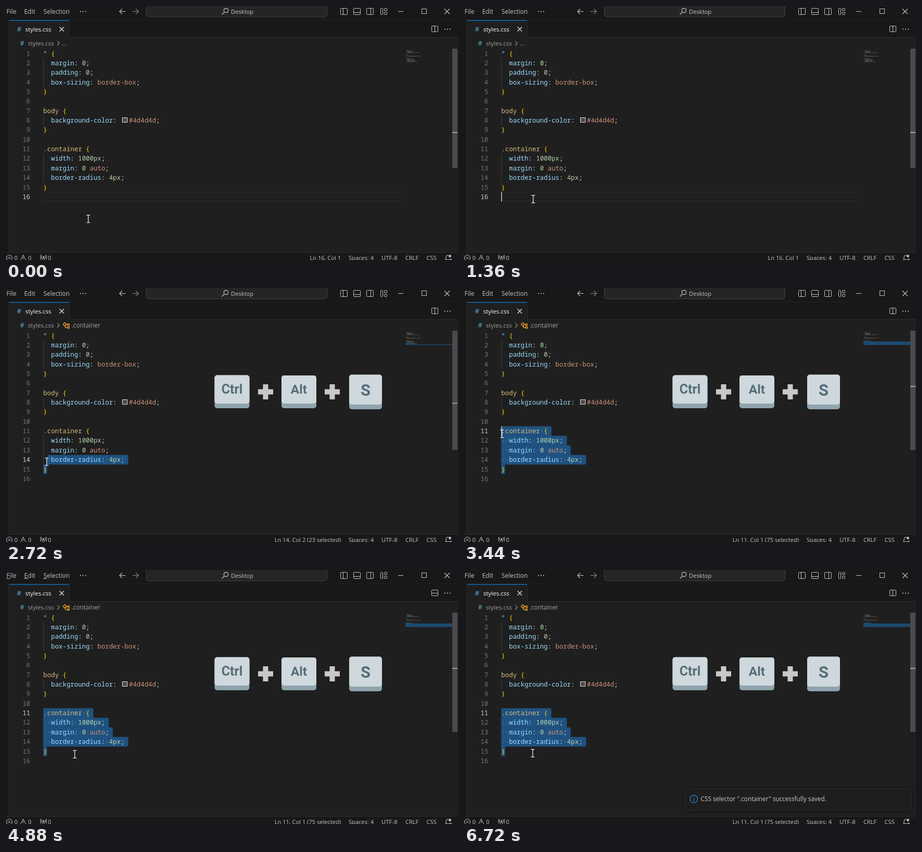
An HTML page with a canvas for the animation above (6800 ms loop, 868 px wide and 488 px high).

```html
<!DOCTYPE html>
<html lang="en">
<head>
<meta charset="utf-8">
<title>Save a CSS selector</title>
<style>
html, body { margin: 0; width: 100%; height: 100%; overflow: hidden; background: #1f1f1f; }
canvas { display: block; }
</style>
</head>
<body>
<canvas id="stage" width="868" height="488"></canvas>
<script>
const LOOP = 6800;
const ctx = document.getElementById('stage').getContext('2d');
const UI = '"Open Sans", "Noto Sans", sans-serif';
const MONO = '12.38px "Noto Sans Mono", "DejaVu Sans Mono", monospace';
const X0 = 71.6, Y0 = 82, CW = 7.43, LH = 18.36;

const COL = { t: '#569cd6', s: '#d7ba7d', b: '#ffd700', p: '#9cdcfe', w: '#d4d4d4', v: '#ce9178', n: '#b5cea8' };
// Each line is a list of [colour key, text]
const prop = (name, ...parts) => [['p', '  ' + name], ['w', ': '], ...parts, ['w', ';']];
const open = (key, name) => [[key, name + ' '], ['b', '{']];
const close = [['b', '}']];
const code = [
  open('t', '*'),
  prop('margin', ['n', '0']),
  prop('padding', ['n', '0']),
  prop('box-sizing', ['v', 'border-box']),
  close, [],
  open('s', 'body'),
  prop('background-color', ['v', '#4d4d4d']),
  close, [],
  open('s', '.container'),
  prop('width', ['n', '1000px']),
  prop('margin', ['n', '0'], ['v', ' auto']),
  prop('border-radius', ['n', '4px']),
  close, []
];
const plain = code.map(l => l.map(p => p[1]).join(''));
const SWATCH_LINE = 8, SWATCH_COL = 20, SWATCH_W = 16;

const path = [
  [0, 158, 409], [1360, 133, 371], [2160, 94, 352], [2400, 80, 352], [2560, 80, 352],
  [3200, 73, 280], [3650, 73, 280], [4280, 129, 361], [4480, 132, 366],
  [4800, 132, 354], [5200, 132, 354], [5400, 132, 352], [LOOP, 132, 352]
];
const DRAG_START = 2480, DRAG_END = 3400;

const clamp = (v, a, b) => Math.min(b, Math.max(a, v));
const ramp = (t, a, b) => { const u = clamp((t - a) / (b - a), 0, 1); return u * u * (3 - 2 * u); };
const lineTop = n => Y0 + (n - 1) * LH;

function pointer(t) {
  let i = 1;
  while (i < path.length - 1 && t > path[i][0]) i++;
  const [ta, xa, ya] = path[i - 1], [tb, xb, yb] = path[i];
  const u = (t - ta) / (tb - ta);
  return { x: xa + (xb - xa) * u, y: ya + (yb - ya) * u };
}

function caretAt(t) {
  if (t < DRAG_START) return { line: 16, col: 0, count: 0 };
  const p = pointer(Math.min(t, DRAG_END));
  const line = clamp(Math.floor((p.y - Y0) / LH) + 1, 11, 15);
  const col = clamp(Math.round((p.x - X0) / CW), 0, plain[line - 1].length);
  let count = 1 - col;
  for (let n = line; n < 15; n++) count += plain[n - 1].length + 2;
  return { line, col, count };
}

function rect(x, y, w, h, c) { ctx.fillStyle = c; ctx.fillRect(x, y, w, h); }
function round(x, y, w, h, r, fill, stroke) {
  ctx.beginPath();
  ctx.roundRect(x, y, w, h, r);
  if (fill) { ctx.fillStyle = fill; ctx.fill(); }
  if (stroke) { ctx.strokeStyle = stroke; ctx.lineWidth = 1; ctx.stroke(); }
}
function line(c, w, ...pts) {
  ctx.strokeStyle = c;
  ctx.lineWidth = w;
  ctx.beginPath();
  for (let i = 0; i < pts.length; i += 2) ctx.lineTo(pts[i], pts[i + 1]);
  ctx.stroke();
}
function ring(x, y, r, c, w = 1) {
  ctx.strokeStyle = c;
  ctx.lineWidth = w;
  ctx.beginPath();
  ctx.arc(x, y, r, 0, 7);
  ctx.stroke();
}
function dot(x, y, r, c) {
  ctx.fillStyle = c;
  ctx.beginPath();
  ctx.arc(x, y, r, 0, 7);
  ctx.fill();
}
function text(s, x, y, c, size, align = 'left', weight = '') {
  ctx.font = `${weight} ${size}px ${UI}`;
  ctx.textAlign = align;
  ctx.fillStyle = c;
  ctx.fillText(s, x, y);
}
function dots(x, y, c) { for (const d of [-5, 0, 5]) dot(x + d, y, 1.1, c); }
function cross(x, y, r, c, w = 1.1) {
  line(c, w, x - r, y - r, x + r, y + r);
  line(c, w, x - r, y + r, x + r, y - r);
}

function titleBar(alt) {
  const c = '#c4c4c4';
  rect(0, 0, 868, 27, '#181818');
  rect(0, 26.5, 868, 1, '#2b2b2b');
  for (const [s, x] of [['File', 1], ['Edit', 35], ['Selection', 72]]) {
    text(s, x, 14.5, c, 11.9);
    if (alt) rect(x, 16, 7, 1, c);
  }
  dots(148, 10.5, c);
  line(c, 1.1, 229.5, 10.5, 218, 10.5);
  line(c, 1.1, 223, 5.5, 218, 10.5, 223, 15.5);
  line('#888', 1.1, 243, 10.5, 254.5, 10.5);
  line('#888', 1.1, 249.5, 5.5, 254.5, 10.5, 249.5, 15.5);
  round(269.5, -8.5, 347, 29.5, 5, '#252526', '#404040');
  ring(422.5, 8.5, 4.2, c, 1.2);
  line(c, 1.3, 419.5, 11.5, 414.5, 16.5);
  text('Desktop', 432, 14.5, c, 11.2);
  for (const x of [649, 674, 699]) round(x - 6.5, 4.5, 13, 12, 1, null, c);
  line(c, 1, 647.5, 4.5, 647.5, 16.5);
  line(c, 1, 667.5, 12.5, 680.5, 12.5);
  line(c, 1, 700.5, 4.5, 700.5, 16.5);
  round(719.5, 4.5, 4, 12, 1, null, c);
  round(726.5, 4.5, 5, 4.5, 1, null, c);
  round(726.5, 12, 5, 4.5, 1, null, c);
  rect(753, 10, 10, 1, c);
  ctx.strokeStyle = c;
  ctx.strokeRect(798.5, 5.5, 9, 9);
  cross(847, 10.5, 5, c);
}

function tabs(alt, selected) {
  rect(0, 27, 5, 446, '#181818');
  rect(5, 27, 863, 33, '#181818');
  rect(5, 60, 863, 1, '#2b2b2b');
  rect(6, 27, 115, 34, '#1f1f1f');
  rect(121, 28, 1, 33, '#2b2b2b');
  rect(5, 27, 1, 446, '#2b2b2b');
  rect(6, 27, 115, 1.3, '#0078d4');
  text('#', 21, 48.5, '#519aba', 13, 'left', 600);
  text('styles.css', 37, 48.7, '#fff', 11.6);
  cross(107, 44.5, 4.2, '#e0e0e0', 1.3);
  const c = '#c8c8c8';
  round(817.5, 38.5, 12, 11, 1, null, c);
  if (alt) line(c, 1, 817.5, 44.5, 829.5, 44.5);
  else line(c, 1, 823.5, 38.5, 823.5, 49.5);
  dots(848, 44.5, c);

  const g = '#a2a2a2';
  text('#', 27, 76, '#519aba', 12.5, 'left', 600);
  text('styles.css', 42, 76, g, 11.6);
  line(g, 1.1, 98.5, 67.5, 102.5, 71.8, 98.5, 76);
  if (!selected) return text('...', 107, 76, g, 11.6);
  const o = '#ee9d28';
  line(o, 1.4, 109.5, 70, 113, 66.5, 116, 69.5, 112.5, 73, 109.5, 70);
  line(o, 1.3, 115, 70.5, 118.5, 70.5);
  line(o, 1.3, 114, 71, 114, 76, 118, 76);
  ctx.strokeStyle = o;
  ctx.strokeRect(118.5, 69, 3, 3);
  ctx.strokeRect(118.5, 74.5, 3, 3);
  text('.container', 126, 76, g, 11.7);
}

function editor(t, caret) {
  const selecting = caret.count > 0;
  if (!selecting) {
    const y = Math.round(lineTop(caret.line));
    rect(72, y + 0.5, 688, 1, '#2d2d2d');
    rect(72, y + 17, 688, 1, '#2d2d2d');
  }
  for (let n = 2; n < 15; n++)
    if (plain[n - 1].startsWith('  ')) rect(71.5, lineTop(n), 1, LH, '#404040');
  if (selecting) {
    for (let n = caret.line; n <= 15; n++) {
      const from = n === caret.line ? caret.col : 0;
      const to = plain[n - 1].length + (n < 15 ? 0.95 : 0);
      const bottom = n === 15 || n === 14 ? 3 : 0;
      round(X0 + from * CW, lineTop(n), (to - from) * CW, LH + 0.3, [n === caret.line ? 3 : 0, 3, bottom, n === 15 ? 3 : 0], '#1f5280');
    }
  }
  ctx.font = MONO;
  code.forEach((parts, i) => {
    const n = i + 1, y = lineTop(n) + 13.5;
    ctx.font = MONO;
    ctx.textAlign = 'right';
    ctx.fillStyle = n === caret.line ? '#d0d0d0' : '#6e7681';
    ctx.fillText(n, 46.5, y);
    ctx.textAlign = 'left';
    let col = 0;
    for (const [key, s] of parts) {
      ctx.fillStyle = COL[key];
      const shift = n === SWATCH_LINE && col >= SWATCH_COL ? SWATCH_W : 0;
      ctx.fillText(s, X0 + col * CW + shift, y);
      col += s.length;
    }
    if (selecting && n >= caret.line)
      [...plain[i]].forEach((ch, k) => {
        if (ch === ' ' && (n > caret.line || k >= caret.col)) dot(X0 + (k + 0.5) * CW, y - 4, 0.9, '#6486a5');
      });
  });
  round(223.5, 214.5, 9.5, 9, 0, '#4d4d4d', '#e0e0e0');
  const blink = t % 1000;
  if (blink >= 100 && blink < 600)
    rect(X0 + caret.col * CW - 0.2, lineTop(caret.line), 1.5, LH, '#cfcfcf');
}

function minimap(caret) {
  const row = n => 84 + (n - 1) * 1.7;
  ctx.globalAlpha = 0.42;
  code.forEach((parts, i) => {
    let col = 0;
    for (const [key, s] of parts) {
      [...s].forEach((ch, k) => {
        if (ch !== ' ') rect(768 + col + k, row(i + 1), 0.85, 1.1, COL[key]);
      });
      col += s.length;
    }
  });
  ctx.globalAlpha = 1;
  if (caret.count) {
    const y = row(caret.line);
    ctx.fillStyle = '#1c4a70';
    ctx.beginPath();
    for (const [px, py] of [[767, y], [774, y], [783, y + 1.8], [857, y + 1.8], [857, 109.5], [767, 109.5]])
      ctx.lineTo(px, Math.min(py, 109.5));
    ctx.fill();
  }
  rect(857, 82, 10, 229, '#4b4b4b');
  rect(857, 188 + (caret.line - 11) * 10.8, 10, 2, '#a0a0a0');
}

function keys() {
  const cap = (x, y, w, h, label, size, base) => {
    round(x, y, w, h, 5, '#8fa4ae');
    round(x, y, w, h - 9, 5, '#cfd8dc');
    ctx.font = `bold ${size}px Roboto, sans-serif`;
    ctx.textAlign = 'center';
    ctx.fillStyle = '#546e7a';
    ctx.fillText(label, x + w / 2, base);
  };
  const plus = (x, y) => {
    rect(x - 14.5, y - 5, 29, 10, '#c8c8ca');
    rect(x - 5, y - 14.5, 10, 29, '#c8c8ca');
  };
  cap(400.5, 167.5, 67, 63.5, 'Ctrl', 25, 203);
  plus(498.5, 199.5);
  cap(529, 168, 67, 63, 'Alt', 24.5, 203);
  plus(626.5, 199.5);
  cap(659, 166.5, 63, 66.5, 'S', 31, 207);
}

function statusBar(caret) {
  const c = '#c4c4c4', y = 488.2;
  rect(0, 473, 868, 15, '#181818');
  rect(0, 473, 868, 1, '#2b2b2b');
  ring(6.5, 484, 5.5, c);
  cross(6.5, 484, 2.3, c, 1);
  text('0', 16, y, c, 11.1);
  line(c, 1, 27.5, 489, 33, 478.5, 38.5, 489);
  line(c, 1, 33, 482, 33, 486);
  text('0', 42.5, y, c, 11.1);
  line(c, 1, 69, 490, 72, 482, 75, 490);
  for (const s of [-1, 1]) {
    line(c, 1, 72 + s * 3, 479.5, 72 + s * 3.6, 482, 72 + s * 3, 485);
    line(c, 1, 72 + s * 5, 478, 72 + s * 6, 482, 72 + s * 5, 487);
  }
  dot(72, 482, 1.3, c);
  text('0', 80.5, y, c, 11.1);
  const sel = caret.count ? ` (${caret.count} selected)` : '';
  text(`Ln ${caret.line}, Col ${caret.col + 1}${sel}`, 643, y, c, 11.1, 'right');
  text('Spaces: 4', 658, y, c, 11.1);
  text('UTF-8', 721, y, c, 11.4);
  text('CRLF', 767, y, c, 11.1);
  text('CSS', 807.5, y, c, 11.2);
  line(c, 1.1, 844, 488, 845, 485, 845, 482, 847, 479, 850, 479);
  line(c, 1.1, 844, 487.5, 855, 487.5, 853.5, 485);
  dot(852.5, 480.5, 2.4, c);
}

function toast(u) {
  if (!u) return;
  ctx.save();
  ctx.beginPath();
  ctx.rect(410, 400, 458, 73);
  ctx.clip();
  ctx.globalAlpha = u;
  ctx.translate(0, (1 - u) * 44);
  ctx.shadowColor = 'rgba(0,0,0,.4)';
  ctx.shadowBlur = 8;
  round(424.5, 419.5, 434, 42, 3, '#1e1e1e');
  ctx.shadowBlur = 0;
  round(424.5, 419.5, 434, 42, 3, null, '#2d2d2d');
  ring(441.5, 440, 7.2, '#2f8fe0', 1.2);
  rect(441, 439, 1.3, 5, '#2f8fe0');
  rect(441, 436, 1.3, 1.5, '#2f8fe0');
  text('CSS selector ".container" successfully saved.', 454.5, 444.3, '#cccccc', 11.78);
  ctx.restore();
}

function beam({ x, y }) {
  const c = '#f0f0f0';
  line(c, 1.3, x, y - 6.5, x, y + 6.5);
  for (const s of [-1, 1]) line(c, 1.2, x - 3.5, y + 7.3 * s, x - 1, y + 7.3 * s, x, y + 6.3 * s, x + 1, y + 7.3 * s, x + 3.5, y + 7.3 * s);
}

function draw(t) {
  const caret = caretAt(t);
  const alt = t >= 4680 && t < 5180;
  rect(0, 0, 868, 488, '#1f1f1f');
  titleBar(alt);
  tabs(alt, t >= DRAG_START);
  editor(t, caret);
  minimap(caret);
  statusBar(caret);
  toast(ramp(t, 5220, 5500));
  ctx.globalAlpha = ramp(t, 1600, 1800);
  keys();
  ctx.globalAlpha = 1;
  beam(pointer(t));
}

const start = performance.now();
function tick() {
  draw((performance.now() - start) % LOOP);
  requestAnimationFrame(tick);
}
tick();
</script>
</body>
</html>
```
